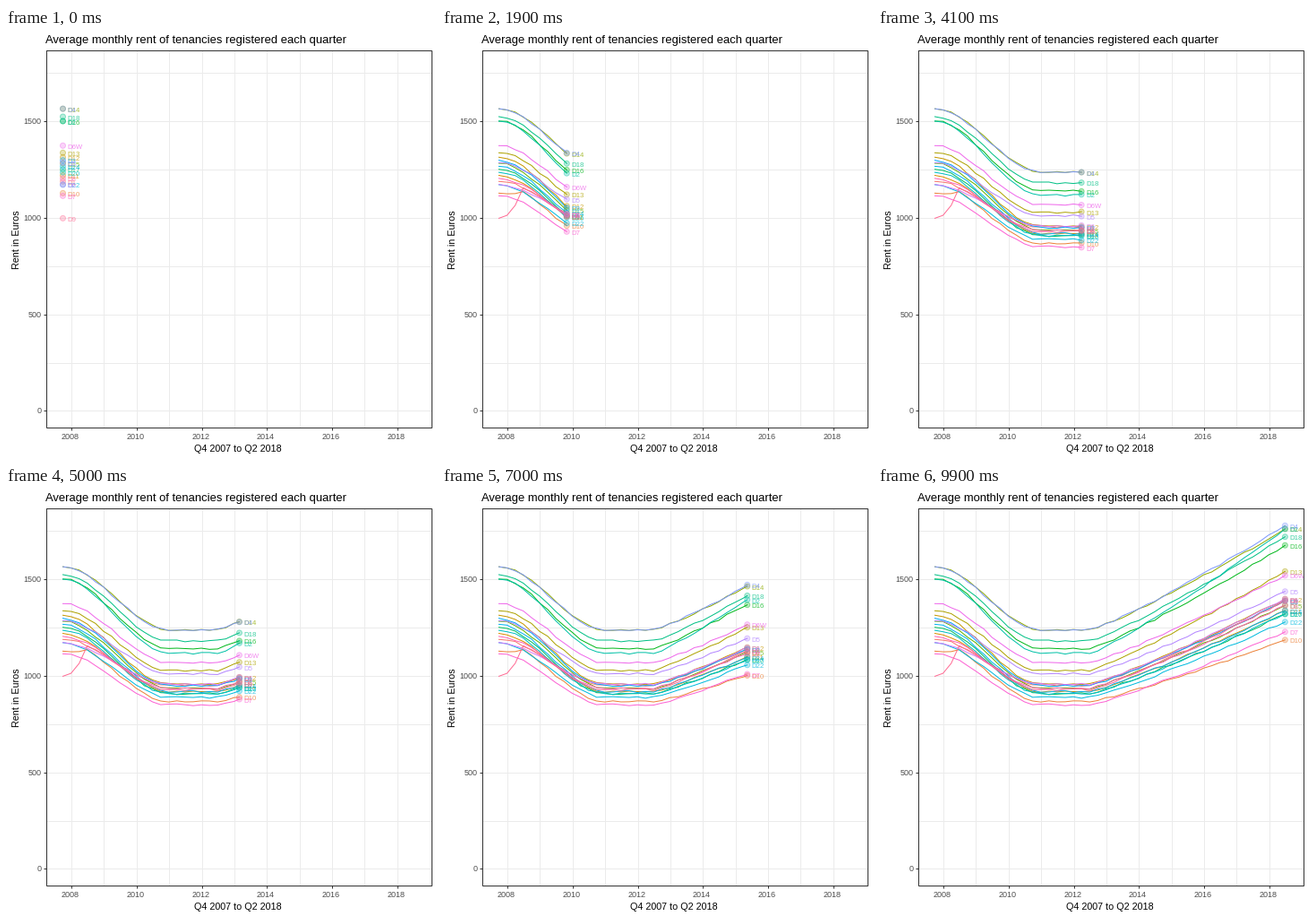
Animation, 480 px wide and 480 px high, one loop 10 s. Source, as a matplotlib script:

```python
import numpy as np
import matplotlib.pyplot as plt
from matplotlib.animation import FuncAnimation

plt.rcParams["font.family"] = "Liberation Sans"

SIZE, DPI = 480, 96
FRAMES, INTERVAL = 100, 100
PT = 72 / DPI
LEFT, RIGHT, TOP, BOTTOM = 44.5, 474.5, 24.5, 445.5
QUARTERS = np.arange(44)
LAST = QUARTERS[-1]
FALL_END, RISE_START = 13, 19

# First rent, lowest rent, last rent and, where needed, an opening shortfall
KEYS = {
    "D14": (1562, 1235, 1758),
    "D4": (1562, 1235, 1775),
    "D18": (1521, 1178, 1717),
    "D16": (1498, 1138, 1673),
    "D2": (1498, 1114, 1758),
    "D6W": (1371, 1065, 1517),
    "D13": (1334, 1025, 1538),
    "D5": (1283, 1008, 1434),
    "D22": (1169, 886, 1276),
    "D10": (1170, 863, 1183, 45),
    "D9": (1190, 925, 1387, 195),
    "D7": (1111, 847, 1225),
}
# The rest start evenly spaced and stay in one bundle
BUNDLE = "D12 D3 D15 D24 D17 D20 D11 D8 D1 D6".split()
for i, name in enumerate(BUNDLE):
    t = i / (len(BUNDLE) - 1)
    wave = np.cos(2 * np.pi * t)
    KEYS[name] = (1311 - 141 * t, 928 + 25 * wave, 1355 + 40 * wave)


def px(q):
    return 63.5 + 9.09 * q


def py(rent):
    return 426.9 - 0.2156 * rent


def snap(v):
    return np.floor(v) + 0.5


def rent_curve(first, low, last, shortfall=0):
    u = np.clip(QUARTERS / FALL_END, 0, 1)
    fall = 1 - u * u * (3 - 2 * u)
    rise = np.clip((QUARTERS - RISE_START) / (LAST - RISE_START), 0, 1) ** 1.15
    late = np.clip(1 - (QUARTERS / 3) ** 2, 0, 1)
    noise = rng.uniform(-5, 5, len(QUARTERS))
    noise[[0, -1]] = 0
    return low + (first - low) * fall + (last - low) * rise - shortfall * late + noise


def hue_color(deg, chroma=100, lum=65):
    """Polar LUV to sRGB."""
    h = np.radians(deg)
    u = chroma * np.cos(h) / (13 * lum) + 0.1978
    v = chroma * np.sin(h) / (13 * lum) + 0.4683
    y = ((lum + 16) / 116) ** 3
    x = 9 * y * u / (4 * v)
    z = -x / 3 - 5 * y + 3 * y / v
    rgb = np.array([[3.2405, -1.5371, -0.4985],
                    [-0.9693, 1.8760, 0.0416],
                    [0.0556, -0.2040, 1.0572]]) @ [x, y, z]
    rgb = np.clip(rgb, 0, 1)
    return np.where(rgb > 0.00304, 1.055 * rgb ** (1 / 2.4) - 0.055, 12.92 * rgb)


rng = np.random.default_rng(4)
names = sorted(KEYS)
rents = [rent_curve(*KEYS[n]) for n in names]
colors = [hue_color(15 + 360 * i / len(names)) for i in range(len(names))]

fig = plt.figure(figsize=(SIZE / DPI, SIZE / DPI), dpi=DPI, facecolor="white")
ax = fig.add_axes([0, 0, 1, 1])
ax.set(xlim=(0, SIZE), ylim=(SIZE, 0))
ax.axis("off")


def rule(xs, ys, color, z=1):
    ax.plot(xs, ys, color=color, lw=PT, zorder=z, solid_capstyle="butt",
            solid_joinstyle="miter")


def label(x, y, text, size, color="black", **kw):
    return ax.text(x, y, text, fontsize=size * PT, color=color,
                   va="baseline", **kw)


for year in range(2008, 2019):
    x = snap(px((year - 2007.75) * 4))
    rule([x, x], [TOP, BOTTOM], "#EBEBEB")
    if year % 2 == 0:
        rule([x, x], [BOTTOM, BOTTOM + 3], "#333333")
        label(x - 0.7, 459, str(year), 9, "#4D4D4D", ha="center")
for rent in range(0, 1751, 250):
    y = snap(py(rent))
    rule([LEFT, RIGHT], [y, y], "#EBEBEB")
    if rent % 500 == 0:
        rule([LEFT - 3, LEFT], [y, y], "#333333")
        label(39.5, y + 3.5, str(rent), 9, "#4D4D4D", ha="right")
rule([LEFT, RIGHT, RIGHT, LEFT, LEFT], [TOP, TOP, BOTTOM, BOTTOM, TOP], "#333333", 6)

label(44, 17, "Average monthly rent of tenancies registered each quarter", 12.95)
label(258.5, 473, "Q4 2007 to Q2 2018", 10.7, ha="center")
ax.text(17.5, 236, "Rent in Euros", fontsize=10.8 * PT, rotation=90,
        ha="right", va="center")

lines = [ax.plot([], [], color=c, lw=PT, zorder=3)[0] for c in colors]
dots = ax.scatter([0] * len(names), [0] * len(names), s=(6 * PT) ** 2,
                  facecolors=[(*c, 0.28) for c in colors],
                  edgecolors=[(*c, 0.4) for c in colors],
                  linewidths=PT, zorder=4)
tags = [label(0, 0, n, 7.7, c, alpha=0.75, zorder=5) for n, c in zip(names, colors)]

# Each quarter lands on a whole frame
ARRIVAL = np.round(QUARTERS * (FRAMES - 1) / LAST)


def draw(frame):
    q = np.interp(frame, ARRIVAL, QUARTERS)
    past = QUARTERS[QUARTERS < q]
    x = px(q)
    heads = []
    for values, line, tag in zip(rents, lines, tags):
        y = py(np.interp(q, QUARTERS, values))
        line.set_data(np.append(px(past), x), np.append(py(values[:len(past)]), y))
        tag.set_position((x + 4.8, y + 3.6))
        heads.append((x, y))
    dots.set_offsets(heads)
    return [*lines, dots, *tags]


anim = FuncAnimation(fig, draw, frames=FRAMES, interval=INTERVAL,
                     repeat=True, repeat_delay=0, blit=False)
plt.show()
```
